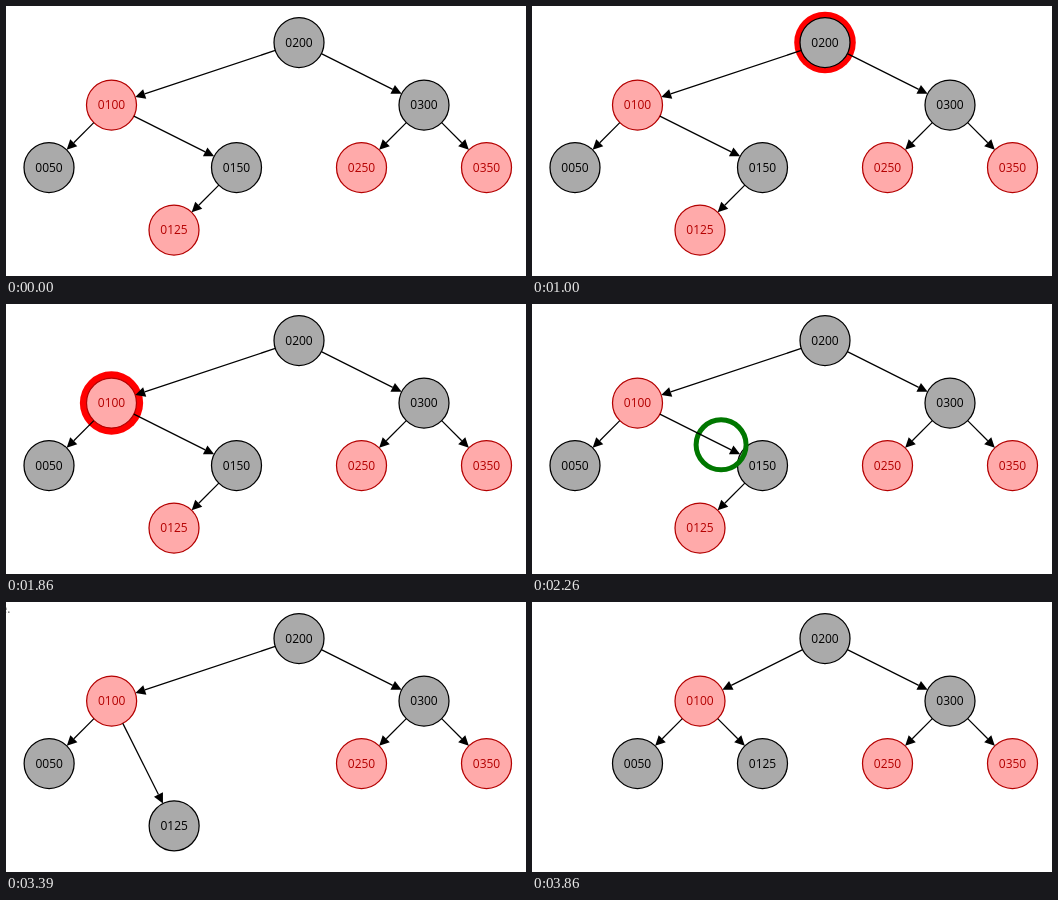
These frames come from a looping animation (520x270 px, 4710 ms). An HTML page:

```html
<!DOCTYPE html>
<html lang="en">
<head>
<meta charset="utf-8">
<title>Tree deletion</title>
<style>
html, body { margin: 0; width: 100%; height: 100%; overflow: hidden; background: #fff; }
svg { display: block; }
text { font: 12px "Open Sans", "Noto Sans", sans-serif; }
.node text { text-anchor: middle; }
.node circle { stroke-width: 1.25; }
.black circle { fill: #aaa; stroke: #000; }
.red circle { fill: #faa; stroke: #b40000; }
.red text { fill: #b40000; }
.edge path { stroke: #000; stroke-width: 1.25; }
#halo { fill: #f00; }
#cursor { fill: none; stroke: #070; stroke-width: 5; }
#note { fill: #555; text-anchor: end; }
</style>
</head>
<body>
<svg id="stage" width="520" height="270" viewBox="0 0 520 270">
  <circle id="halo"/>
  <g id="nodes"></g>
  <circle id="cursor" r="25"/>
  <g id="edges"></g>
  <text id="note" x="4.5" y="11">e.</text>
</svg>
<script>
const LOOP = 4710, R = 25, GRID = 62.5;
const DETACH = 2950, REMOVE = 3390, SETTLE = 3860;
const $ = id => document.getElementById(id);

// Grid column, row and colour; optional final column and row.
const nodes = {
  '0200': { at: [4, 0], color: 'black' },
  '0100': { at: [1, 1], color: 'red', to: [2, 1] },
  '0300': { at: [6, 1], color: 'black' },
  '0050': { at: [0, 2], color: 'black', to: [1, 2] },
  '0150': { at: [3, 2], color: 'black' },
  '0250': { at: [5, 2], color: 'red' },
  '0350': { at: [7, 2], color: 'red' },
  '0125': { at: [2, 3], color: 'red', to: [3, 2] }
};

const edges = [
  ['0200', '0100'], ['0200', '0300'], ['0100', '0050'],
  ['0300', '0250'], ['0300', '0350'],
  ['0100', '0150', 0, DETACH],
  ['0150', '0125', 0, REMOVE],
  ['0100', '0125', DETACH, LOOP]
].map(([from, to, start = 0, end = LOOP]) => ({ from, to, start, end }));

const halos = [['0200', 530, 1050], ['0100', 1490, 1940], ['0150', 2430, DETACH]];
const hops = [['0200', '0100', 1050, 1460, 1490], ['0100', '0150', 1940, 2420, 2430]];

const clamp = v => Math.min(1, Math.max(0, v));
const mix = (a, b, p) => a.map((v, i) => v + (b[i] - v) * p);
const place = ([col, row]) => [43 + col * GRID, 36.5 + row * GRID];
const show = (el, on) => el.setAttribute('visibility', on ? 'visible' : 'hidden');

function add(parent, tag, attrs = {}) {
  const el = document.createElementNS('http://www.w3.org/2000/svg', tag);
  for (const key in attrs) el.setAttribute(key, attrs[key]);
  return parent.appendChild(el);
}

function moveTo(el, [x, y]) {
  el.setAttribute('cx', x);
  el.setAttribute('cy', y);
}

for (const [label, n] of Object.entries(nodes)) {
  n.el = add($('nodes'), 'g');
  add(n.el, 'circle', { r: R });
  add(n.el, 'text', { y: 4 }).textContent = label;
}
for (const e of edges) {
  e.el = add($('edges'), 'g', { class: 'edge' });
  e.line = add(e.el, 'path');
  e.head = add(e.el, 'polygon');
}

function drawEdge(e) {
  const [ax, ay] = nodes[e.from].pos, [bx, by] = nodes[e.to].pos;
  const d = Math.hypot(bx - ax, by - ay);
  const ux = (bx - ax) / d, uy = (by - ay) / d;
  const tx = bx - ux * R, ty = by - uy * R;
  const qx = tx - ux * 10, qy = ty - uy * 10;
  e.line.setAttribute('d', `M${ax + ux * R} ${ay + uy * R}L${qx} ${qy}`);
  e.head.setAttribute('points',
    `${tx},${ty} ${qx - uy * 5},${qy + ux * 5} ${qx + uy * 5},${qy - ux * 5}`);
}

// Triangle wave between the narrow and the wide halo.
function haloRadius(t) {
  const phase = ((t - 480 + 1750) % 1750) / 1750;
  return R + 3.75 + 5 * Math.abs(1 - 2 * phase);
}

function draw(t) {
  const p = clamp((t - REMOVE) / (SETTLE - REMOVE));
  for (const n of Object.values(nodes)) {
    n.pos = mix(place(n.at), place(n.to || n.at), p);
    n.el.setAttribute('transform', `translate(${n.pos})`);
    n.el.setAttribute('class', 'node ' + n.color);
  }
  if (t >= REMOVE) nodes['0125'].el.setAttribute('class', 'node black');
  show(nodes['0150'].el, t < REMOVE);

  for (const e of edges) {
    show(e.el, t >= e.start && t < e.end);
    drawEdge(e);
  }

  const halo = halos.find(([, start, end]) => t >= start && t < end);
  show($('halo'), halo);
  if (halo) {
    moveTo($('halo'), nodes[halo[0]].pos);
    $('halo').setAttribute('r', haloRadius(t));
  }

  const hop = hops.find(([, , start, , end]) => t >= start && t < end);
  show($('cursor'), hop);
  if (hop) {
    const [from, to, start, arrive] = hop;
    moveTo($('cursor'), mix(nodes[from].pos, nodes[to].pos, clamp((t - start) / (arrive - start))));
  }

  show($('note'), t >= DETACH && t < REMOVE + 50);
}

function tick() {
  draw(performance.now() % LOOP);
  requestAnimationFrame(tick);
}
tick();
</script>
</body>
</html>
```
